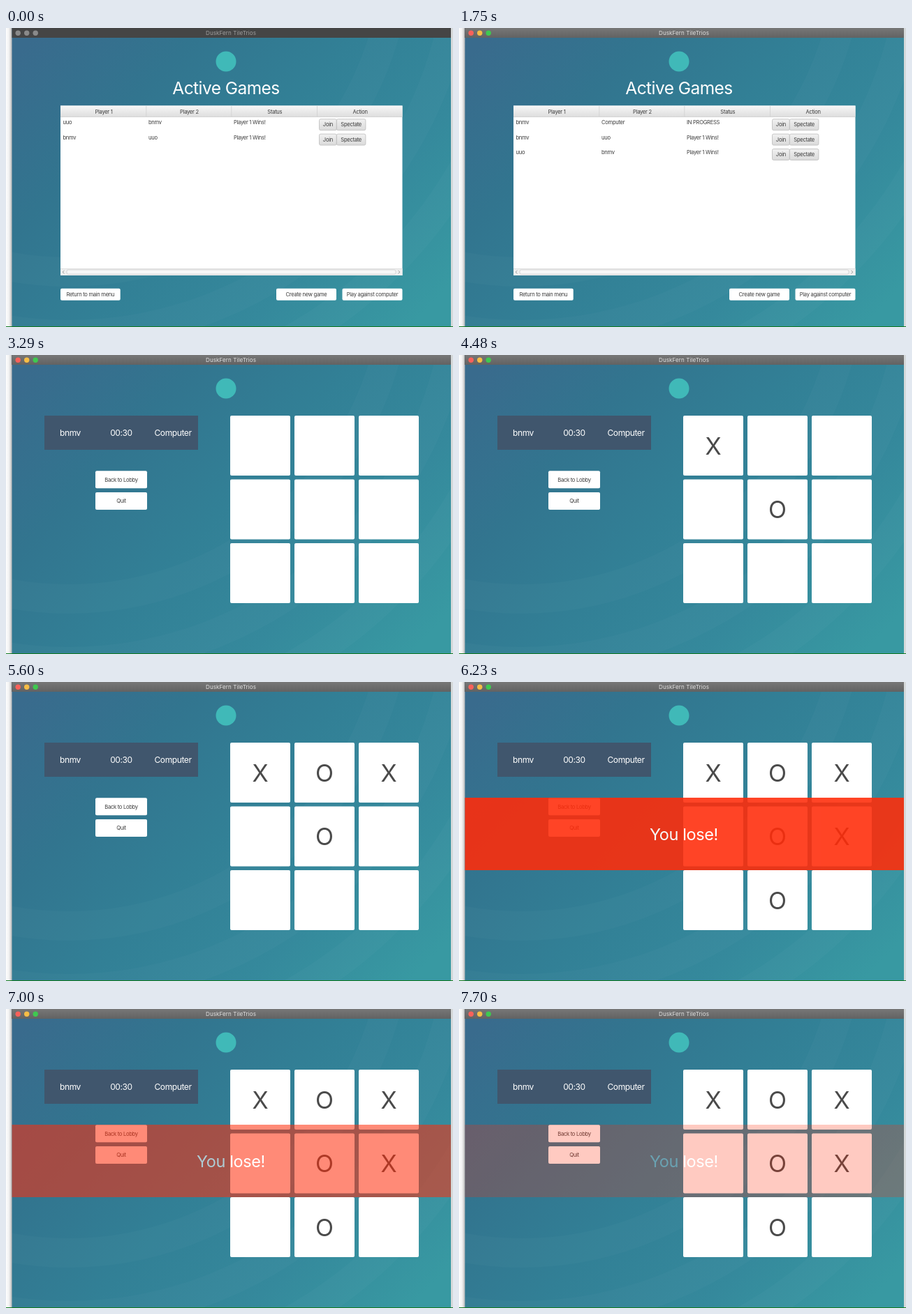
Animation of 640x429 px, one loop 7770 ms. Source, as an HTML page:

```html
<!DOCTYPE html>
<html lang="en">
<head>
<meta charset="utf-8">
<title>Tile game lobby</title>
<style>
  html, body { margin: 0; width: 100%; height: 100%; overflow: hidden; background: #fff; }
  svg { display: block; width: 640px; height: 429px; }
  text { font: 7.6px Inter, "Open Sans", sans-serif; letter-spacing: -.29px; fill: #3c3c3c; }
  .mid { text-anchor: middle; }
  .bar { font-size: 8px; letter-spacing: .1px; }
  .heading { font-size: 24.5px; letter-spacing: -.55px; fill: #fff; }
  .score { font-size: 12px; letter-spacing: -.4px; fill: #fff; }
  .mark { font-size: 34px; letter-spacing: 0; fill: #4a4a4a; }
  .result { font-size: 23.5px; letter-spacing: -.4px; fill: #fff; }

  .step { animation: 7.77s step-end infinite; }
  .focus { animation-name: focus; }
  .before { animation-name: before; }
  .after { animation-name: after; }
  .hover { animation-name: hover; }
  .lobby { animation-name: lobby; }
  .game { animation-name: game; }
  .x1 { animation-name: x1; }
  .o1 { animation-name: o1; }
  .x2 { animation-name: x2; }
  .o2 { animation-name: o2; }
  .x3 { animation-name: x3; }
  .o3 { animation-name: o3; }
  .banner { animation: banner 7.77s linear infinite; }

  @keyframes focus { from { opacity: 0 } 7.2% { opacity: 1 } }
  @keyframes before { from { opacity: 1 } 18% { opacity: 0 } }
  @keyframes after { from { opacity: 0 } 18% { opacity: 1 } }
  @keyframes hover { from { opacity: 0 } 37.8% { opacity: 1 } }
  @keyframes lobby { from { opacity: 1 } 41.4% { opacity: 0 } }
  @keyframes game { from { opacity: 0 } 41.4% { opacity: 1 } }
  @keyframes x1 { from { opacity: 0 } 52.2% { opacity: 1 } }
  @keyframes o1 { from { opacity: 0 } 53.1% { opacity: 1 } }
  @keyframes x2 { from { opacity: 0 } 63% { opacity: 1 } }
  @keyframes o2 { from { opacity: 0 } 63.9% { opacity: 1 } }
  @keyframes x3 { from { opacity: 0 } 77.4% { opacity: 1 } }
  @keyframes o3 { from { opacity: 0 } 79.2% { opacity: 1 } }
  @keyframes banner { from, 79.19% { opacity: 0 } 79.2% { opacity: 1 } to { opacity: .24 } }
</style>
</head>
<body>
<svg id="stage" viewBox="0 0 640 429"></svg>
<script>
const rect = (x, y, w, h, fill, extra = '') =>
  `<rect x="${x}" y="${y}" width="${w}" height="${h}" fill="${fill}" ${extra}/>`;
const text = (x, y, str, cls = '') => `<text x="${x}" y="${y}" class="${cls}">${str}</text>`;
const group = (cls, ...parts) => `<g class="${cls}">${parts.join('')}</g>`;
const gradient = (id, coords, ...stops) =>
  `<linearGradient id="${id}" ${coords}>` + stops.map((c, i) =>
    `<stop offset="${i / (stops.length - 1)}" stop-color="${c}"/>`).join('') + '</linearGradient>';

const down = 'x1="0" y1="0" x2="0" y2="1"';
const rival = 'Computer', me = 'bnmv', guest = 'uuo', won = 'Player 1 Wins!';

const defs = '<defs>' +
  gradient('sea', 'gradientUnits="userSpaceOnUse" x1="60" y1="-10" x2="560" y2="450"',
    '#396b8d', '#32758f', '#328096', '#35899c', '#3899a2') +
  gradient('edge', 'x1="0" y1="0" x2="1" y2="0"', '#fff', '#f0f0f0', '#b4b4b4') +
  gradient('barOn', down, '#777', '#626262') +
  gradient('head', down, '#f7f7f7', '#dedede') +
  gradient('btn', down, '#f1f1f1', '#dadada') +
  '<clipPath id="win"><rect x="8.5" y="0" width="628.5" height="428"/></clipPath></defs>';

const lights = colors => colors.map((c, i) =>
  `<circle cx="${17.2 + i * 12.5}" cy="7.2" r="3.7" fill="${c}"/>`).join('');
const barTitle = fill => `<text x="322" y="10.2" class="mid bar" style="fill:${fill}">DuskFern TileTrios</text>`;

const frame = rect(0, 0, 9, 428, 'url(#edge)') + rect(637, 0, 3, 428, '#d5d9da') +
  '<g clip-path="url(#win)">' + rect(8, 0, 630, 428, 'url(#sea)') +
  [470, 560, 650].map(r =>
    `<circle cx="90" cy="-120" r="${r}" fill="none" stroke="#fff" stroke-opacity=".018" stroke-width="42"/>`).join('') +
  '</g>' +
  rect(8.5, 0, 628.5, 14, '#454545') + lights(['#8a8a8a', '#8a8a8a', '#8a8a8a']) + barTitle('#a0a0a0') +
  group('step focus', rect(8.5, 0, 628.5, 14, 'url(#barOn)'),
    lights(['#f9615a', '#f6bd45', '#3fc950']), barTitle('#e2e2e2')) +
  rect(0, 428, 640, 1, '#137a22') +
  '<circle cx="315" cy="48" r="14.5" fill="#40b9b8"/>';

const whiteButton = (x, y, w, h, label) =>
  rect(x, y, w, h, '#fff', 'rx="2"') + text(x + w / 2, y + h / 2 + 2.7, label, 'mid');
const greyButton = (x, y, w, label, fill = 'url(#btn)') =>
  rect(x, y, w, 16, fill, 'rx="2" stroke="#bcbcbc" stroke-width=".8"') +
  text(x + w / 2, y + 10.7, label, 'mid');

const row = (i, one, two, status) => {
  const y = 138.2 + i * 21.4;
  return text(81.5, y, one) + text(204, y, two) + text(326, y, status) +
    greyButton(448.5, y - 7.5, 24.8, 'Join') + greyButton(473.4, y - 7.5, 41.5, 'Spectate');
};

const table = rect(78, 111.5, 489.5, 243.5, '#fff') +
  rect(78, 111.5, 489.5, 15.7, 'url(#head)') + rect(78, 127, 489.5, .7, '#c4c4c4') +
  [200.5, 322.5, 445].map(x => rect(x, 112, .7, 15, '#cdcdcd')).join('') +
  ['Player 1', 'Player 2', 'Status', 'Action'].map((s, i) =>
    text(140 + i * 122.4, 122.9, s, 'mid')).join('') +
  rect(78, 345, 489.5, 10, '#f0f0f0') + rect(78, 345, 489.5, .6, '#d2d2d2') +
  rect(87, 347, 471, 6.2, '#f7f7f7', 'rx="2" stroke="#c8c8c8" stroke-width=".7"') +
  '<path d="M83.5 348l-2.5 2.2 2.5 2.2M561.5 348l2.5 2.2-2.5 2.2" fill="none" stroke="#8d8d8d" stroke-width=".8"/>';

const lobby = group('step lobby',
  text(315, 94.5, 'Active Games', 'mid heading'),
  table,
  group('step before', row(0, guest, me, won), row(1, me, guest, won)),
  group('step after', row(0, me, rival, 'IN PROGRESS'), row(1, me, guest, won), row(2, guest, me, won)),
  group('step hover', greyButton(448.5, 130.7, 24.8, 'Join', '#f8f8f8')),
  whiteButton(78, 373.7, 85.7, 17, 'Return to main menu'),
  whiteButton(387, 373.7, 86, 17, 'Create new game'),
  whiteButton(481.5, 373.7, 86, 17, 'Play against computer'));

const tileX = c => 321 + c * 92, tileY = r => 87 + r * 91.5;
const tiles = Array.from({ length: 9 }, (_, i) =>
  rect(tileX(i % 3), tileY(Math.floor(i / 3)), 86, 86, '#fff', 'rx="2"')).join('');
const moves = [['x1', 0, 0], ['o1', 1, 1], ['x2', 2, 0], ['o2', 1, 0], ['x3', 2, 1], ['o3', 1, 2]];
const marks = moves.map(([id, c, r]) =>
  text(tileX(c) + 43, tileY(r) + 55.6, id[0].toUpperCase(), `mid mark step ${id}`)).join('');

const game = group('step game',
  rect(55, 87, 220, 49, '#40566d'),
  text(92, 116, me, 'mid score'), text(165, 116, '00:30', 'mid score'), text(239, 116, rival, 'mid score'),
  whiteButton(128, 166.3, 74, 25, 'Back to Lobby'),
  whiteButton(128, 197, 74, 25, 'Quit'),
  tiles, marks);

const banner = group('banner',
  rect(8.5, 166, 628.5, 104, '#ff2c0a', 'fill-opacity=".92"'),
  text(322, 226.5, 'You lose!', 'mid result'));

document.getElementById('stage').innerHTML = defs + frame + lobby + game + banner;
</script>
</body>
</html>
```
